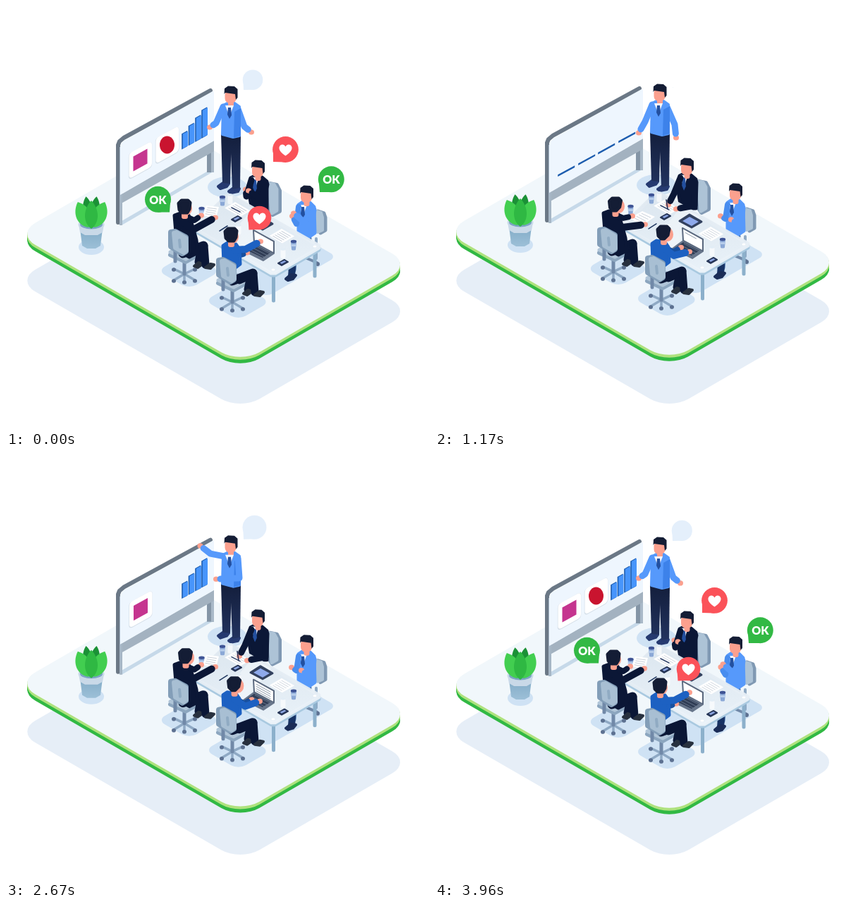
Recreate the animation shown at these times as an HTML page with a canvas. Size 600x600 px, loop 3.99 s.

```html
<!DOCTYPE html>
<html lang="en">
<head>
<meta charset="utf-8">
<title>Team meeting</title>
<style>
html,body{margin:0;width:100%;height:100%;overflow:hidden;background:#fff}
canvas{display:block;width:600px;height:600px}
</style>
</head>
<body>
<canvas id="stage" width="600" height="600"></canvas>
<script>
const c = document.getElementById('stage').getContext('2d');
const LOOP = 3990, TAU = Math.PI * 2;
const SKIN = '#fba08e', HAIR = '#141d35', NAVY = '#0b1736', SKY = '#5699fb', ROYAL = '#1d61c2';

// Track: rows of [time, ...values], eased between rows
function track(t, rows) {
  let i = 0;
  while (i < rows.length - 2 && t >= rows[i + 1][0]) i++;
  const a = rows[i], b = rows[i + 1];
  const u = Math.min(1, Math.max(0, (t - a[0]) / (b[0] - a[0])));
  const e = u * u * (3 - 2 * u);
  return a.slice(1).map((v, k) => v + (b[k + 1] - v) * e);
}
function poly(fill, ...p) {
  c.beginPath();
  for (let i = 0; i < p.length; i += 2) c.lineTo(p[i], p[i + 1]);
  c.closePath();
  c.fillStyle = fill;
  c.fill();
}
function soft(fill, r, ...p) {
  poly(fill, ...p);
  c.lineJoin = 'round';
  c.strokeStyle = fill;
  c.lineWidth = r;
  c.stroke();
}
function line(color, w, ...p) {
  c.beginPath();
  for (let i = 0; i < p.length; i += 2) c.lineTo(p[i], p[i + 1]);
  c.strokeStyle = color;
  c.lineWidth = w;
  c.lineCap = c.lineJoin = 'round';
  c.stroke();
}
function oval(fill, x, y, rx, ry = rx, rot = 0) {
  c.beginPath();
  c.ellipse(x, y, rx, ry, rot, 0, TAU);
  c.fillStyle = fill;
  c.fill();
}
function box(fill, x, y, w, h, r = 0) {
  c.beginPath();
  c.roundRect(x, y, w, h, r);
  c.fillStyle = fill;
  c.fill();
}
function iso(fill, x, y, w, h, r) {
  c.save();
  c.transform(.866, .5, -.866, .5, x, y);
  box(fill, 0, 0, w, h, r);
  c.restore();
}
function shade(y0, y1, a, b) {
  const g = c.createLinearGradient(0, y0, 0, y1);
  g.addColorStop(0, a);
  g.addColorStop(1, b);
  return g;
}
function arm(color, w, sx, sy, ex, ey, hx, hy) {
  const d = Math.hypot(hx - ex, hy - ey) || 1;
  const k = Math.max(0, 1 - 6 / d);
  const wx = ex + (hx - ex) * k, wy = ey + (hy - ey) * k;
  line(SKIN, 6, wx, wy, hx, hy);
  oval(SKIN, hx, hy, 4, 3.6);
  line(color, w, sx, sy, ex, ey, wx, wy);
}

function platform() {
  const slab = (f, dy) => iso(f, 257, 183.3 + dy, 367, 280, 31);
  for (let d = 9; d > 4; d--) slab('#32b944', d);
  for (let d = 4; d > 0; d--) slab('#afe27e', d);
  slab('#f1f7fb', 0);
  const s = '#cfe2f4';
  iso(s, 259, 350, 52, 51, 12);
  iso(s, 327, 392, 55, 52, 12);
  iso(s, 404, 318, 75, 115, 10);
  oval(s, 314, 257, 28, 15);
  oval(s, 121, 342, 18, 11);
}

function board() {
  poly('#c6d9e9', 164, 305, 290, 232, 294, 235, 164, 311);
  box('#8495a6', 285, 198, 10, 38);
  box('#a9b9c8', 291, 198, 4, 38);
  poly('#a3b2c0', 160, 269, 295, 191, 295, 206, 160, 282);
  line('#6b7886', 6, 159, 307, 159, 197, 161, 192, 167, 187, 290, 120);
  box('#a7b7c6', 161, 200, 4, 111);
  poly('#eef6fe', 162, 199, 165, 193, 169, 190, 293, 121, 295, 122, 295, 191, 162, 268);
}

function card(x, y, s, round) {
  if (s < .02) return;
  c.save();
  c.transform(s, -.55 * s, 0, s, x, y);
  box('#d5dfe9', -16.7, -18.2, 33.4, 37.5, 5);
  box('#fff', -16, -18.2, 32.5, 36.4, 5);
  if (!round) box('#c5358f', -10, -10.5, 20, 21);
  c.restore();
  if (round) oval('#c9142f', x, y, 10.5 * s, 12.5 * s);
}

function chart(t) {
  const end = [250, 259.5, 269, 278], tall = [21, 27, 33, 39];
  const wide = [175, 204, 232, 261], flat = [1.5, 1.5, 1.5, 1.5];
  const row = (time, x, w, h) => [time, ...x, ...w, ...h];
  const thin = [8, 8, 8, 8], long = [24, 24, 24, 24];
  const v = track(t, [
    row(0, end, thin, tall), row(430, end, thin, tall),
    row(690, [224, 247, 264, 277], [14, 12, 10, 9], [15, 23, 30, 37]),
    row(1050, wide, long, flat), row(1250, wide, long, flat),
    row(1770, [206, 237, 260, 276], [17, 14, 12, 10], [13, 16, 11, 6]),
    row(2150, end, thin, [7, 10, 9, 7]), row(2250, end, thin, [9, 12, 11, 9]),
    row(2750, end, thin, tall), row(LOOP, end, thin, tall)
  ]);
  for (let i = 0; i < 4; i++) {
    const x = v[i], w = v[i + 4], h = v[i + 8];
    c.save();
    c.transform(1, -.545, 0, 1, x, 203 - .555 * (x - 250));
    box('#1c5cae', -.8, -h - 1.2, w, h + 1.2);
    if (h > 3) box('#4795fb', .8, -h, w - .8, h - .4);
    c.restore();
  }
}

function cards(t) {
  const [x, y, a, b] = track(t, [
    [0, 190.5, 218.5, 1, 1], [460, 190.5, 218.5, 1, 1], [690, 190.5, 218.5, .28, .35],
    [800, 190.5, 218.5, 0, 0], [1800, 214, 205, 0, 0], [2150, 214, 205, 1, 0],
    [2350, 214, 205, 1, 0], [2700, 190.5, 218.5, 1, 0], [2950, 190.5, 218.5, 1, 1], [LOOP, 190.5, 218.5, 1, 1]
  ]);
  card(x, y, a, false);
  card(228.5, 197, b, true);
}

function leaf(color, x, y, w, h, rot) {
  c.save();
  c.translate(x, y);
  c.rotate(rot);
  c.beginPath();
  c.moveTo(0, 0);
  c.bezierCurveTo(-w, -h * .2, -w, -h * .7, 0, -h);
  c.bezierCurveTo(w, -h * .7, w, -h * .2, 0, 0);
  c.fillStyle = color;
  c.fill();
  c.restore();
}
function plant() {
  poly(shade(318, 345, '#84adc8', '#9dc0d8'), 105, 316, 137, 316, 134, 340, 127, 344, 115, 344, 108, 340);
  poly('#c9d9e8', 103, 310, 139, 310, 137, 321, 130, 325, 112, 325, 105, 321);
  oval('#c9d9e8', 121, 310, 18.5, 8.5);
  oval('#7aa3c4', 121, 310, 16, 6.5);
  leaf('#1b9136', 118, 305, 9, 35, -.13);
  leaf('#1b9136', 124, 305, 9, 35, .13);
  leaf('#42ce50', 117, 314, 14, 39, -.4);
  leaf('#42ce50', 125, 314, 14, 39, .4);
  leaf('#2fb843', 121, 316, 12, 40, 0);
}

function face(x, y) {
  box(SKIN, x - 4, y + 4, 8, 12, 3);
  box(SKIN, x - 8.5, y - 8, 16, 19, 7);
  poly(HAIR, x - 9.5, y - 2, x - 9, y - 10, x - 4, y - 13.5, x + 5, y - 13, x + 9.5, y - 9,
    x + 9.5, y + 3, x + 7, y + 6, x + 6, y - 2, x - 8, y - 4);
}
function collar(x, y) {
  poly('#f5f8ff', x - 7, y, x + 5, y, x - 1, y + 16);
  poly('#2350a0', x - 3, y + 3, x + 1, y + 3, x + 2, y + 14, x - 1, y + 19, x - 4, y + 13);
}

function presenter(t) {
  const rest = [298, 166, 289, 172, 338, 171, 348, 179];
  const p = track(t, [
    [0, ...rest], [300, ...rest], [690, 300, 166, 287, 172, 338, 170, 353, 175],
    [1170, 298, 167, 289, 183, 340, 171, 342, 190], [1700, 292, 153, 269, 157, 333, 170, 314, 171],
    [2250, 290, 153, 267, 147, 331, 174, 298, 171], [2950, 290, 132, 280, 118, 331, 174, 298, 178],
    [3150, 290, 132, 280, 118, 331, 174, 298, 178], [3600, ...rest], [LOOP, ...rest]
  ]);
  soft('#263a70', 4, 301, 256, 308, 251, 316, 252, 313, 256, 304, 259);
  soft('#263a70', 4, 316, 263, 323, 258, 331, 259, 329, 263, 319, 265);
  const cloth = shade(185, 260, '#141f3d', '#22335f');
  poly(cloth, 305, 181, 320, 184, 318, 252, 307, 251);
  poly(cloth, 318, 183, 333, 182, 332, 258, 321, 260);
  const left = () => arm(SKY, 9, 308, 143, ...p.slice(0, 4));
  const right = () => arm(SKY, 9, 329, 146, ...p.slice(4));
  if (p[6] > 335) right();
  left();
  soft(SKY, 4, 308, 141, 314, 138, 324, 138, 331, 143, 331, 184, 322, 186, 307, 182);
  poly('#3d82ea', 324, 150, 333, 145, 333, 184, 323, 187);
  if (p[6] <= 335) right();
  face(319, 127);
  collar(318, 141);
}

function chairBase(x, y) {
  const col = '#7189a8';
  for (const [dx, dy] of [[-15, -7], [15, -7], [-15, 9], [15, 9], [0, 11]]) {
    line('#8fa9c4', 3.5, x, y, x + dx, y + dy);
    oval('#5d7191', x + dx, y + dy + 1, 3, 2.8);
  }
  line(col, 5, x, y - 20, x, y);
  soft('#8ca6bf', 6, x - 20, y - 27, x + 2, y - 37, x + 20, y - 27, x + 2, y - 17);
  soft('#b0c5d8', 5, x - 20, y - 31, x + 2, y - 41, x + 20, y - 31, x + 2, y - 21);
}
function chairBack(x, y) {
  line('#7189a8', 5, x - 13, y - 34, x - 13, y - 18);
  soft('#839eb8', 8, x - 19, y - 59, x - 13, y - 60, x + 2, y - 52, x + 2, y - 32, x - 3, y - 29, x - 19, y - 39);
  soft('#a8bfd3', 6, x - 15, y - 58, x - 11, y - 59, x + 2, y - 51, x + 3, y - 33, x - 1, y - 30, x - 13, y - 37);
  line('#90abc3', 4, x - 7, y - 48, x - 6, y - 38);
}
function backHead(x, y, turn) {
  box(SKIN, x - 4, y + 5, 9, 12, 3);
  oval(SKIN, x + 3 + turn, y + 2, 8, 10);
  soft(HAIR, 5, x - 8, y - 5, x - 4, y - 9, x + 5, y - 9, x + 8, y - 6, x + 7 - turn * .3, y + 3,
    x + 4 - turn, y + 8, x - 3, y + 8, x - 7, y + 4);
}

// Seated on the far sides of the table
function manBack(t) {
  const clap = [341, 270, 340, 260, 363, 275, 344, 262];
  const write = [339, 269, 331, 285, 368, 286, 342, 291];
  const p = track(t, [
    [0, ...clap], [300, ...clap], [650, 341, 267, 327, 280, 368, 286, 342, 291],
    [1100, ...write], [2650, ...write], [3060, 343, 267, 332, 269, 363, 282, 341, 280],
    [3350, ...clap], [LOOP, ...clap]
  ]);
  soft('#8099b3', 6, 374, 252, 384, 254, 388, 262, 388, 291, 378, 296, 374, 290);
  soft('#adc3d6', 5, 373, 252, 380, 253, 384, 260, 384, 290, 377, 294);
  soft(NAVY, 5, 347, 244, 353, 241, 363, 243, 370, 249, 370, 290, 349, 290, 345, 266);
  c.save();
  c.translate(354, 244);
  c.scale(.95, 1.15);
  c.translate(-354, -244);
  collar(354, 243);
  c.restore();
  face(357.5, 232);
  return p;
}
function manBackArms(t, p) {
  const k = clapping(t);
  arm(NAVY, 9, 348, 247, p[0], p[1], p[2] - k, p[3]);
  arm(NAVY, 9, 369, 253, p[4], p[5], p[6] + k, p[7]);
  if (t > 700 && t < 2850) line('#26345c', 1.6, p[2] - 1, p[3] + 6, p[2] - 3, p[3] - 7);
}
function clapping(t) {
  const on = track(t, [[0, 1], [250, 1], [450, 0], [3200, 0], [3400, 1], [LOOP, 1]])[0];
  return on * 1.5 * Math.abs(Math.sin(TAU * 8 * t / LOOP));
}
function manRight(t) {
  const clap = [412, 309, 406, 298, 432, 314, 408, 294];
  const fold = [412, 305, 405, 301, 434, 315, 420, 306];
  const p = track(t, [[0, ...clap], [250, ...clap], [600, ...fold], [2600, ...fold], [3000, ...clap], [LOOP, ...clap]]);
  const k = clapping(t);
  line('#8fa9c4', 4, 440, 330, 440, 358);
  line('#7189a8', 4, 427, 358, 441, 364);
  oval('#5d7191', 442, 366, 3);
  soft('#8099b3', 5, 442, 291, 451, 294, 453, 300, 453, 318, 446, 322);
  soft('#adc3d6', 4, 440, 291, 447, 293, 449, 300, 449, 318, 442, 321);
  line('#416ba6', 11, 428, 330, 408, 345, 406, 374);
  line('#173264', 10, 406, 371, 405, 383);
  soft('#1b2d58', 4, 397, 387, 404, 381, 411, 382, 407, 387, 400, 389);
  soft(SKY, 5, 415, 282, 421, 278, 431, 279, 437, 285, 438, 322, 429, 328, 415, 321);
  c.save();
  c.translate(2, 6);
  collar(420, 276);
  c.restore();
  face(426.5, 268);
  arm('#488deF', 8, 415, 285, p[0], p[1], p[2] - k, p[3]);
  arm(SKY, 9, 436, 289, p[4], p[5], p[6] + k, p[7]);
}

function cup(x, y) {
  poly('#8ba8d6', x - 4, y - 5, x + 4, y - 5, x + 3, y + 6, x - 3, y + 6);
  oval('#8ba8d6', x, y + 6, 3, 1.5);
  box('#b7cdeb', x - 3.8, y - 1, 7.6, 3);
  oval('#3f5495', x, y - 5, 4.2, 2.2);
}
function glass(x, y) {
  box('rgba(255,255,255,.65)', x - 3.5, y - 5, 7, 13, 2);
  oval('#e2edf6', x, y - 5, 3.5, 1.8);
}
function phone(x, y) {
  soft('#263557', 2, x - 7, y + 1, x + 2, y - 4, x + 7, y - 1, x - 2, y + 4);
  poly('#8aa4e0', x - 4.5, y, x + 2, y - 3, x + 4.5, y - 1.5, x - 2, y + 2);
}
function sheet(x, y, w, h) {
  c.save();
  c.transform(.866, .5, -.866, .5, x, y);
  box('#fff', 0, 0, w, h);
  for (let i = 3; i < h - 2; i += 3.5) box('#b9c3d0', 3, i, w - 6, .8);
  c.restore();
}
function table() {
  line('#8cb0cb', 5, 438, 345, 438, 383);
  line('#8cb0cb', 5, 379.5, 380, 379.5, 418);
  const rim = [266, 315, 313, 269, 319, 269, 444, 340, 444, 343, 382, 379, 376, 379];
  c.save();
  c.translate(0, 3);
  soft('#a9c9e0', 5, ...rim);
  c.restore();
  c.globalAlpha = .94;
  soft(shade(268, 382, '#dfe8f0', '#edf4fa'), 5, ...rim);
  c.globalAlpha = 1;
  poly('rgba(255,255,255,.35)', 310, 335, 350, 287, 376, 302, 336, 350);
  oval('#fff', 379, 374, 2.5, 1.5);
  oval('#fff', 438, 341, 2.5, 1.5);
  cup(307, 276);
  glass(318, 273);
  cup(277.5, 292);
  sheet(325, 278, 25, 17);
  phone(327, 302);
  line('#1f365f', 1.5, 303, 319, 314, 312);
  line('#34466c', 1.5, 320, 286, 332, 292);
  soft('#33415f', 3, 347, 308, 361, 299, 378, 309, 364, 317);
  poly('#8ea9eb', 351, 308, 361, 302, 374, 309, 364, 315);
  sheet(391, 316, 21, 20);
  glass(330, 316);
  glass(393, 350);
  cup(408, 339);
  phone(393, 364);
}
function laptop(t) {
  soft('#68768b', 2, 337, 347, 352, 336, 380, 351, 365, 361);
  poly('#303d55', 341, 346, 352, 338, 375, 350, 364, 357);
  for (let i = 0; i < 3; i++) line('#8795aa', .6, 345 + i * 4, 345 - i * 2.5, 366 + i * 4, 356 - i * 2.5);
  soft('#59677d', 2, 351, 318, 380, 334, 380, 350, 352, 336);
  poly('#fff', 352, 319.5, 379, 334.5, 379, 349, 353, 335);
  const n = track(t, [[0, 0], [690, 0], [2400, 4], [2700, 4], [2950, 0], [LOOP, 0]])[0];
  for (let i = 0; i < 4; i++) {
    const k = Math.min(1, n - i);
    if (k > 0) line('#8c99aa', 1, 355, 324.5 + i * 3.2, 355 + 20 * k, 324.5 + i * 3.2 + 11 * k);
  }
}

// Seated on the near side, seen from behind
function legs(x, y) {
  line(NAVY, 11, x + 8, y - 31, x + 24, y - 38, x + 20, y - 18);
  soft('#28313f', 4, x + 14, y - 12, x + 20, y - 17, x + 26, y - 15, x + 19, y - 10);
  line(NAVY, 13, x - 2, y - 30, x + 27, y - 41);
  line(NAVY, 11, x + 28, y - 41, x + 30, y - 14);
  soft('#28313f', 4, x + 30, y - 10, x + 37, y - 15, x + 42, y - 14, x + 37, y - 9);
}
function manLeft(t) {
  const hold = [284, 283, 302, 285, 298, 301, 279, 297, 277, 297, 297, 300];
  const p = track(t, [
    [0, ...hold], [400, ...hold], [690, 277, 292, 297, 289, 299, 305, 281, 308, 276, 301, 298, 309],
    [950, 294, 294, 312, 302, 294, 314, 276, 304, 280, 301, 298, 313],
    [1300, 294, 294, 312, 302, 294, 314, 276, 304, 280, 301, 298, 313], [1700, ...hold], [LOOP, ...hold]
  ]);
  const turn = track(t, [[0, 0], [350, 0], [650, 2.5], [2500, 2.5], [2900, 0], [LOOP, 0]])[0];
  chairBase(253, 380);
  legs(253, 381);
  poly('#fff', ...p.slice(0, 8));
  for (let i = 1; i < 5; i++) {
    const k = i / 5, m = (a, b) => p[a] + (p[b] - p[a]) * k;
    const x0 = m(0, 6), y0 = m(1, 7), x1 = m(2, 4), y1 = m(3, 5);
    line('#bac4d0', .8, x0 + (x1 - x0) * .15, y0 + (y1 - y0) * .15, x0 + (x1 - x0) * .85, y0 + (y1 - y0) * .85);
  }
  arm(NAVY, 8, 258, 300, 267, 304, p[8], p[9]);
  soft(NAVY, 5, 239, 297, 247, 294, 259, 297, 263, 307, 270, 332, 272, 350, 260, 356, 243, 346);
  arm(NAVY, 10, 245, 302, 266, 317, p[10], p[11]);
  backHead(253 + turn, 285, turn);
  chairBack(253, 380);
}
function manFront(t) {
  const reach = [340, 345, 361, 334, 333, 353, 342, 350, 319];
  const type = [339, 357, 361, 351, 338, 352, 349, 346, 324];
  const push = [343, 344, 347, 323, 333, 353, 342, 350, 319];
  const tap = t > 800 && t < 2600 ? Math.sin(t / 55) * .8 : 0;
  const p = track(t, [
    [0, ...reach], [250, ...reach], [600, ...type], [2600, ...type], [3000, ...push],
    [3120, ...push], [3500, ...reach], [LOOP, ...reach]
  ]);
  chairBase(321, 420);
  legs(323, 420);
  arm('#18509f', 8, 327, 346, p[4], p[5], p[6], p[7] - tap);
  soft(ROYAL, 5, 308, 340, 314, 336, 326, 338, 331, 345, 332, 366, 324, 372, 309, 364);
  arm(ROYAL, 10, 324, 346, p[0], p[1], p[2], p[3] + tap);
  backHead(p[8], 325, (p[8] - 319) * .6);
  chairBack(321, 420);
}

// Bubble centred at (dx, dy) from its tail tip
function bubble(x, y, dx, dy, r, color, [s, rot], inside) {
  if (s < .01) return;
  c.save();
  c.translate(x, y);
  c.rotate(rot);
  c.scale(s, s);
  oval(color, dx, dy, r);
  poly(color, 0, 0, dx - Math.sign(dx) * r * .95, dy + r * .2, dx, dy + r * .98);
  c.translate(dx, dy);
  inside();
  c.restore();
}
function okText() {
  c.fillStyle = '#fff';
  c.font = '900 16px Lato, "Open Sans", sans-serif';
  c.textAlign = 'center';
  c.textBaseline = 'alphabetic';
  c.fillText('OK', 0, 6.5);
}
function heart() {
  c.beginPath();
  c.moveTo(0, 9);
  c.bezierCurveTo(-6, 5, -9.5, 1, -9, -3);
  c.bezierCurveTo(-8, -8, -2, -8.5, 0, -4);
  c.bezierCurveTo(2, -8.5, 8, -8, 9, -3);
  c.bezierCurveTo(9.5, 1, 6, 5, 0, 9);
  c.fillStyle = '#fff';
  c.fill();
}
function notes(t) {
  const step = [1620, 2120, 2620];
  const up = track(t, [[0, 2], [1500, 0], [2050, 0], [2200, 1], [2550, 1], [2750, 2], [LOOP, 2]])[0];
  const late = t < 1000 ? t + LOOP : t;
  step.forEach((s, i) => {
    const shown = Math.min(1, (late - s) / 150);
    const cut = Math.min(1, Math.max(0, (late - 3920 - i * 150) / 180));
    if (shown <= 0 || cut >= 1) return;
    const y = 5 + (i - up) * 4.6;
    line('#72879d', 1.9, -7.5 + 15 * cut, y, -7.5 + 15 * shown, y - .4);
  });
}
function bubbles(t) {
  const pop = (on, off, end, tilt) => track(t, [
    [0, 1, 0], [off, 1, 0], [end, 0, 0], [on, 0, tilt * 2], [on + 220, 1.04, tilt],
    [on + 480, 1, -tilt * .3], [on + 620, 1, 0], [LOOP, 1, 0]
  ]);
  const talk = track(t, [[0, .84, 0], [360, 0, 0], [1140, 0, 0], [1450, 1, 0], [3840, 1, 0], [LOOP, .84, 0]]);
  bubble(337, 119, 15.5, -17, 17, '#e4effb', talk, notes);
  bubble(379, 221, 17.5, -17.5, 18.4, '#fb5259', pop(3180, 350, 650, -.17), heart);
  bubble(445, 264, 16.3, -18.2, 18.5, '#32b944', pop(2790, 560, 820, -.17), okText);
  bubble(232, 292.5, -16.5, -18.2, 18.5, '#32b944', pop(3230, 640, 940, .17), okText);
  bubble(344.5, 317.5, 15, -17, 16.8, '#fb5259', pop(2975, 460, 745, -.17), heart);
}

function draw(t) {
  c.clearRect(0, 0, 600, 600);
  c.fillStyle = '#fff';
  c.fillRect(0, 0, 600, 600);
  iso('#e6eef7', 257, 249.5, 367, 280, 31);
  c.save();
  c.translate(0, -1.6 * (1 - Math.cos(TAU * (t - 30) / (LOOP / 2))));
  platform();
  board();
  cards(t);
  chart(t);
  plant();
  presenter(t);
  const back = manBack(t);
  manRight(t);
  table();
  manBackArms(t, back);
  laptop(t);
  manLeft(t);
  manFront(t);
  bubbles(t);
  c.restore();
}

let start = null;
function frame(now) {
  if (start === null) start = now;
  draw((now - start) % LOOP);
  requestAnimationFrame(frame);
}
draw(0);
requestAnimationFrame(frame);
</script>
</body>
</html>
```
